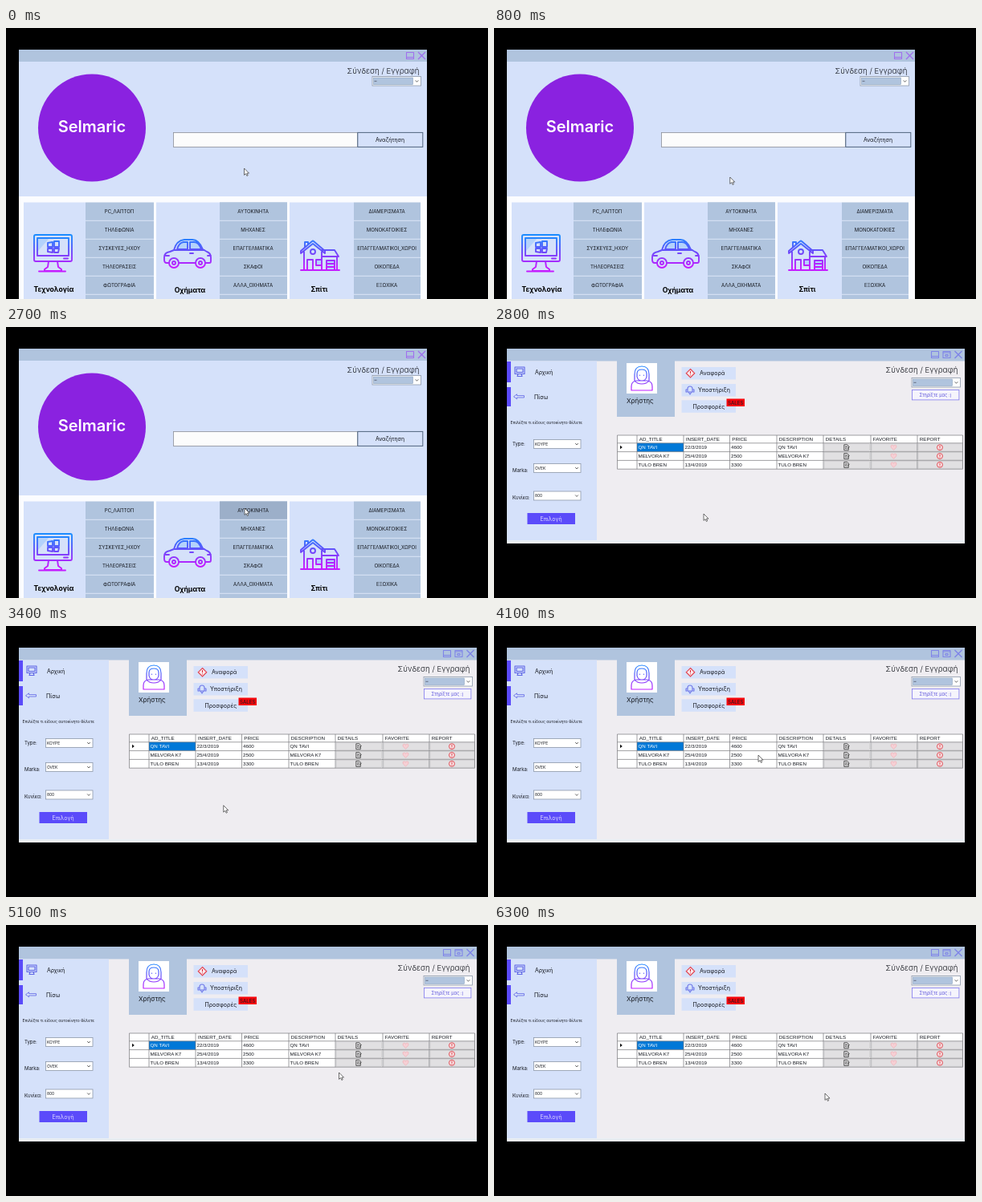
Recreate the animation shown at these times as an HTML page. Size 600 by 338 pixels, loop 6.4 s.

```html
<!DOCTYPE html>
<html lang="el">
<head>
<meta charset="utf-8">
<title>Αγγελίες</title>
<style>
html, body { margin: 0; width: 100%; height: 100%; overflow: hidden; background: #000; }
svg { display: block; width: 600px; height: 338px; }
text { font-family: Inter, "Open Sans", sans-serif; fill: #15181f; }
.light { font-weight: 300; }
.grid text { font-family: "Liberation Sans", sans-serif; }
.line { fill: none; stroke: url(#ink); stroke-width: 1.9; stroke-linejoin: round; stroke-linecap: round; }
.thin { fill: none; stroke: #7f84e8; stroke-width: 1.1; stroke-linejoin: round; }
#home .thin { stroke: #a070ee; }
</style>
</head>
<body>
<svg id="stage" viewBox="0 0 600 338"></svg>
<script>
const LOOP = 6400, STEP = 100, SWITCH = 2800;
const PALE = '#d5e1fa', STEEL = '#b0c4de', INDIGO = '#5b4bfa';

const rect = (x, y, w, h, fill, extra = '') =>
  `<rect x="${x}" y="${y}" width="${w}" height="${h}" fill="${fill}" ${extra}/>`;
const text = (x, y, size, str, extra = '') =>
  `<text x="${x}" y="${y}" font-size="${size}" ${extra}>${str}</text>`;
const path = (d, extra = '') => `<path d="${d}" ${extra}/>`;
const ring = (x, y, r) => `M${x - r} ${y}a${r} ${r} 0 1 0 ${2 * r} 0a${r} ${r} 0 1 0 ${-2 * r} 0`;
const mid = 'text-anchor="middle"';
const border = color => `stroke="${color}" stroke-width=".8"`;

const minimise = x => path(`M${x} 30.5h9v8h-9zM${x} 36.5h9`, 'class="thin"');
const maximise = x => path(`M${x} 30.5h9v8h-9zM${x} 32h9M${x + 3} 34.5h3v2h-3z`, 'class="thin"');
const close = x => path(`M${x} 30l9 9m0-9l-9 9`, 'class="thin" style="stroke-width:1.4"');
const chevron = (x, y) => path(`M${x - 1.8} ${y - 1}l1.8 2l1.8-2`, 'fill="none" stroke="#444" stroke-width=".8"');

const account = (x, y) =>
  rect(x, y, 60.5, 11.5, '#fff', border('#8d98aa')) +
  rect(x + 1.5, y + 1.5, 49, 8.5, STEEL, 'stroke="#7d95b5" stroke-width=".5"') +
  path(`M${x + 2.5} ${y + 5.8}h3`, 'stroke="#445" stroke-width=".7"') +
  chevron(x + 55.5, y + 5.8);

const select = (y, value) =>
  rect(49.5, y, 58.5, 11, '#fff', border('#8d98aa')) +
  text(51, y + 7.3, 4.9, value) + chevron(103, y + 5.5);

const login = x => text(x, 57.3, 9.6, 'Σύνδεση / Εγγραφή', mid + ' class="light"');

// Home screen: each icon has outlines and tinted panes
const icons = [
  { panes: 'M40 262h14l-14 16z',
    lines: 'M37 258h43q2 0 2 2v29q0 2-2 2h-43q-2 0-2-2v-29q0-2 2-2zM39 262h39v22h-39z' +
      'M52 268l6-1v6h-6zM60 266h6v7h-6zM52 275h6v5l-6-1zM60 275h6l-1 5h-5z' +
      'M53 291l-1 7l-4 3v2h21v-2l-4-3l-1-7M41 303.5h33M72 287.5h5' },
  { panes: 'M213 276q2-8 8-9h5v9zM229 267h5q6 0 9 9h-14z',
    lines: 'M203 293h-3q-3 0-3-4v-3q0-6 7-7l5-2q3-12 13-13h10q8 0 13 12l5 3q5 2 5 7v5q0 2-2 2h-5M215 293h21' +
      'M210 277h37M213 276q2-8 8-9h5v9zM229 267h5q6 0 9 9h-14zM229 281h4M199 284h4M251 284h4' +
      ring(209, 293, 6) + ring(242, 293, 6) + ring(209, 293, 2) + ring(242, 293, 2) },
  { panes: 'M386 289h7v7h-7zM399 290h11v11h-11z',
    lines: 'M367 281v-3l14-12q1-1 2 0l14 12v3l-15-12zM371 279v22M372 273v-6h4v3M393 279v22M367 302h48' +
      'M393 277h16l5 8h-21M412 286v15M375 301v-12h7v12M386 289h7v7h-7zM399 301v-11h10v11M399 294h10M399 298h10' +
      ring(382, 279, 3) }
];

const cards = [
  { x: 22, split: 99, end: 184, title: 'Τεχνολογία', tx: 59.5, ty: 328.5,
    rows: ['PC_ΛΑΠΤΟΠ', 'ΤΗΛΕΦΩΝΙΑ', 'ΣΥΣΚΕΥΕΣ_ΗΧΟΥ', 'ΤΗΛΕΟΡΑΣΕΙΣ', 'ΦΩΤΟΓΡΑΦΙΑ'] },
  { x: 187, split: 266, end: 350, title: 'Οχήματα', tx: 229, ty: 330,
    rows: ['ΑΥΤΟΚΙΝΗΤΑ', 'ΜΗΧΑΝΕΣ', 'ΕΠΑΓΓΕΛΜΑΤΙΚΑ', 'ΣΚΑΦΟΙ', 'ΑΛΛΑ_ΟΧΗΜΑΤΑ'] },
  { x: 353, split: 433, end: 516, title: 'Σπίτι', tx: 390, ty: 328.5,
    rows: ['ΔΙΑΜΕΡΙΣΜΑΤΑ', 'ΜΟΝΟΚΑΤΟΙΚΙΕΣ', 'ΕΠΑΓΓΕΛΜΑΤΙΚΟΙ_ΧΩΡΟΙ', 'ΟΙΚΟΠΕΔΑ', 'ΕΞΩΧΙΚΑ'] }
];

function card({ x, split, end, title, tx, ty, rows }, n) {
  const w = end - split;
  let out = rect(x, 217.5, split - x, 121, PALE) + rect(split, 217.5, w, 121, STEEL);
  rows.forEach((label, i) => {
    const y = 217.5 + i * 23;
    if (n === 1 && i === 0) out += rect(split, y, w, 22.5, STEEL, 'id="hot"');
    out += path(`M${split} ${y + 22.8}h${w}`, 'stroke="#dce7f8" stroke-width="1"');
    out += text(split + w / 2 - .4, y + 13, 6.05, label, mid);
  });
  return out + path(icons[n].panes, 'fill="#b4d2fb"') + path(icons[n].lines, 'class="line"') +
    text(tx, ty, 8.6, title, mid + ' font-weight="700" style="fill:#000"');
}

const home = () =>
  rect(16, 27, 508, 311, '#fbfcff') + rect(16, 27, 508, 15, STEEL) + rect(16, 42, 508, 168, PALE) +
  minimise(498.5) + close(513) +
  '<circle cx="107" cy="124.5" r="67" fill="#8a22e0"/>' +
  text(107, 130, 20, 'Selmaric', mid + ' font-weight="600" style="fill:#fff"') +
  login(469.5) + account(456, 60.5) +
  rect(208.4, 130.4, 229, 18, '#fcfcfc', border('#8b8f98')) +
  rect(437.8, 130.4, 81, 18, PALE, 'stroke="#52657f" stroke-width="1"') +
  text(478, 141.8, 6.9, 'Αναζήτηση', mid) +
  cards.map(card).join('');

// List screen
const cols = [153.5, 178, 236, 293.5, 352, 410, 469, 527, 583.5];
const heads = ['AD_TITLE', 'INSERT_DATE', 'PRICE', 'DESCRIPTION', 'DETAILS', 'FAVORITE', 'REPORT'];
const ads = [
  ['QN TAVI', '22/3/2019', '4600'],
  ['MELVORA K7', '25/4/2019', '2500'],
  ['TULO BREN', '13/4/2019', '3300']
];

function grid() {
  let out = rect(153.5, 135, 430, 42, '#fff');
  heads.forEach((h, i) => out += text(cols[i + 1] + 2.8, 142.2, 6.2, h));
  ads.forEach(([title, date, price], r) => {
    const y = 144.8 + r * 10.8;
    if (!r) out += rect(178, y, 58, 10.8, '#0078d7');
    [title, date, price, title].forEach((v, i) =>
      out += text(cols[i + 1] + 1.5, y + 7.5, 6.2, v, !r && !i ? 'style="fill:#fff"' : ''));
    [410, 469, 527].forEach((x, i) =>
      out += rect(x + 1, y + 1, i < 2 ? 56.5 : 55, 8.8, '#e1e0e2', 'stroke="#c3c2c5" stroke-width=".6"'));
    out += path(`M435.8 ${y + 2}h4l1.5 1.5v5.5h-5.5zM437 ${y + 4.5}h3M437 ${y + 6.5}h2M439.5 ${y + 7.5}l3-3`,
      'fill="none" stroke="#333" stroke-width=".8"');
    out += path(`M497.5 ${y + 8.8}l-3.2-3.2q-1.2-3 1.2-3.2q1.6 0 2 1.4q.4-1.4 2-1.4q2.4.2 1.2 3.2z`,
      'fill="#f6cfd4" stroke="#efabb3" stroke-width=".6"');
    out += `<circle cx="555" cy="${y + 5.4}" r="3.5" fill="#f6dfe1" stroke="#df424b" stroke-width=".9"/>` +
      path(`M555 ${y + 3.3}v2.6m0 .9v.8`, 'stroke="#df2f3a" stroke-width=".9"');
  });
  const rules = cols.map(x => `M${x} 135v42.2`).join('') +
    [135, 144.8, 155.6, 166.4, 177.2].map(y => `M153.5 ${y}h430`).join('');
  return `<g class="grid">${out}${path(rules, 'stroke="#77777b" stroke-width=".7" fill="none"')}` +
    path('M157 147.7l2.8 2.3l-2.8 2.3z', 'fill="#111"') + '</g>';
}

const action = (y, tx, label) => rect(233.5, y, 67.5, 15.5, PALE) + text(tx, y + 10.2, 7.1, label);

const list = () =>
  rect(16, 27, 570, 243, '#efedf1') + rect(16, 27, 570, 15.5, STEEL) +
  rect(16, 42.5, 112, 223.5, PALE) + rect(16, 266, 570, 4, '#eaf0f5') +
  minimise(544.5) + maximise(559) + close(573.5) +
  rect(16, 43, 5, 26, INDIGO) + rect(16, 75, 5, 24, INDIGO) +
  path('M26 50h12v8.5h-12zM28 52h8v4.5h-8zM30 58.5l-1 3h6l-1-3', 'class="thin" style="stroke:#5e65e5"') +
  path('M24.5 86.8l4-3v1.8h9v2.4h-9v1.8z', 'class="thin" style="stroke:#6b72e8;stroke-width:.9"') +
  text(51, 59, 6.9, 'Αρχική') + text(50, 89.8, 7.1, 'Πίσω') +
  text(20.5, 121, 5, 'Επιλέξτε τι είδους αυτοκίνητο θέλετε') +
  text(23, 148.3, 6, 'Type:') + select(140.5, 'ΚΟΥΡΕ') +
  text(23, 180.5, 6, 'Marka:') + select(170.5, 'OVEK') +
  text(23, 214.5, 6, 'Κυνίκα:') + select(205, '800') +
  rect(41.5, 232, 59.5, 14, INDIGO) + text(71, 241.8, 7, 'Επιλογή', mid + ' style="fill:#dcd8ff"') +
  rect(153, 42, 72, 70, STEEL) + rect(165, 45, 38, 38, '#fff') +
  path('M171 79v-5q0-6 6-7h14q6 1 6 7v5zM175 67v-8q0-10 9-10t9 10v8q-3 4-9 4t-9-4z' +
    'M178 58q0-5 6-5t6 5v4q-1 5-6 5t-6-5zM181.5 60v.3M186.5 60v.3',
    'class="line" style="stroke:url(#ink2);stroke-width:1.2"') +
  text(165, 95.3, 8.1, 'Χρήστης') +
  action(50, 256, 'Αναφορά') + action(71, 254, 'Υποστήριξη') + action(91.3, 247.5, 'Προσφορές') +
  path('M244.5 52.5l5.2 5.2l-5.2 5.2l-5.2-5.2z', 'fill="#fae8ec" stroke="#e34550" stroke-width="1.2"') +
  path('M244.5 55v3.2m0 1.2v1', 'stroke="#d92c38" stroke-width="1"') +
  path('M241 80v-3q0-3 3-3t3 3v3M239 78h2v3h-2zM247 78h2v3h-2zM242 81l2 3l2-3z', 'class="thin" style="stroke:#6f78e8"') +
  rect(289.5, 89.5, 22.5, 9.5, '#f5060c') + text(300.8, 96.6, 6.2, 'SALES', mid) +
  login(532.5) + account(520, 63.5) +
  rect(520.4, 78.4, 58.5, 12.5, '#f5f4fc', border('#8078ee')) +
  text(549.5, 86.8, 5.6, 'Στηρίξτε μας :)', mid + ' style="fill:#6259dc"') +
  grid();

const gradient = (id, y1, y2) =>
  `<linearGradient id="${id}" gradientUnits="userSpaceOnUse" x1="0" y1="${y1}" x2="0" y2="${y2}">` +
  '<stop offset="0" stop-color="#1c8cff"/><stop offset=".5" stop-color="#6a4bfa"/>' +
  '<stop offset="1" stop-color="#c41cff"/></linearGradient>';

const stage = document.getElementById('stage');
stage.innerHTML =
  `<defs>${gradient('ink', 260, 298)}${gradient('ink2', 48, 80)}` +
  '<clipPath id="view"><rect width="600" height="338"/></clipPath></defs>' +
  `<g clip-path="url(#view)"><g id="home">${home()}</g><g id="list">${list()}</g></g>` +
  path('M0 0v8.4l2-1.8l1.4 2.9l1.3-.7l-1.3-2.7h2.6z', 'id="cursor" fill="#fff" stroke="#333" stroke-width=".7"');

const [homeEl, listEl, hot, cursor] = ['home', 'list', 'hot', 'cursor'].map(id => document.getElementById(id));

// time, x, y of the pointer
const track = [
  [0, 296.5, 175], [600, 296.5, 175], [1000, 291, 197], [1300, 296, 219], [1400, 297, 226],
  [2799, 297, 226], [2800, 261, 233], [3300, 261, 233], [3700, 300, 196], [4000, 329, 161],
  [4100, 329, 161], [4600, 434, 150], [4800, 432, 158], [5100, 414.5, 184], [5400, 412, 205],
  [5600, 412, 210], [LOOP, 412, 210]
];

function pointer(t) {
  const i = Math.max(1, track.findIndex(p => p[0] >= t));
  const [t0, x0, y0] = track[i - 1], [t1, x1, y1] = track[i];
  const k = (t - t0) / (t1 - t0);
  return [x0 + (x1 - x0) * k, y0 + (y1 - y0) * k];
}

function draw(now) {
  const t = Math.floor(now % LOOP / STEP) * STEP;
  const first = t < SWITCH;
  homeEl.style.display = first ? '' : 'none';
  listEl.style.display = first ? 'none' : '';
  hot.setAttribute('fill', t < 1400 ? STEEL : t < 2200 ? '#a3b2cb' : '#9cafc9');
  cursor.setAttribute('transform', `translate(${pointer(t).join(' ')})`);
}

const start = performance.now();
function tick() {
  draw(performance.now() - start);
  requestAnimationFrame(tick);
}
tick();
</script>
</body>
</html>
```
